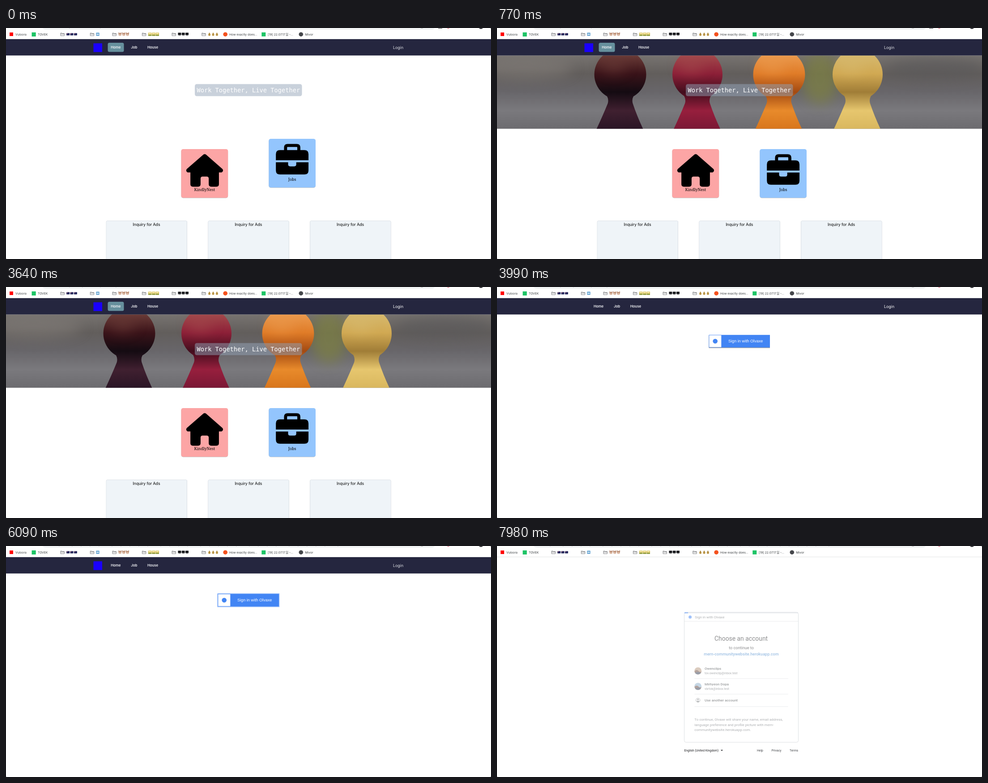
An HTML page that plays this animation: 1084x517 px, repeating every 8 s.

```html
<!DOCTYPE html>
<html lang="en">
<head>
<meta charset="utf-8">
<title>Work Together, Live Together</title>
<style>
  html, body { margin: 0; width: 100%; height: 100%; overflow: hidden; background: #fff; }
  svg { display: block; width: 100%; height: 100%; }
  text { font-family: Inter, "Noto Sans CJK KR", "Noto Sans CJK", sans-serif; white-space: pre; }
  .mono { font-family: "DejaVu Sans Mono", monospace; }
  .serif { font-family: "Noto Serif", serif; }
  .arial { font-family: "Liberation Sans", sans-serif; }
  .roboto { font-family: Roboto, sans-serif; }
  .soft { filter: blur(0.7px); }
  .haze { filter: blur(14px); }
</style>
</head>
<body>
<svg id="stage" viewBox="0 0 1084 517" preserveAspectRatio="none"></svg>
<script>
const LOOP = 8000, STEP = 70;
const AT = {
  cardRest: 350, photo: 770, jobOn: 2450, jobOff: 2520, loginOn: 3010, request: 3640,
  loginPage: 3990, loginOff: 4060, logo: 4340, buttonOn: 4620, redirect: 6090,
  blank: 7140, chooser: 7210, fade: 7910
};

const stage = document.getElementById('stage');
const rect = (x, y, w, h, fill, more = '') =>
  `<rect x="${x}" y="${y}" width="${w}" height="${h}" fill="${fill}" ${more}/>`;
const circle = (x, y, r, fill, more = '') =>
  `<circle cx="${x}" cy="${y}" r="${r}" fill="${fill}" ${more}/>`;
const path = (d, fill, more = '') => `<path d="${d}" fill="${fill}" ${more}/>`;
const text = (x, y, size, str, fill, more = '') =>
  `<text x="${x}" y="${y}" font-size="${size}" fill="${fill}" ${more}>${str}</text>`;
const group = (id, body, more = '') => `<g id="${id}" ${more}>${body}</g>`;
const MID = 'text-anchor="middle"';

// Browser chrome
const emoji = {
  flag: x => rect(x - 3.7, 11.6, 7, 4.8, '#22275c', 'rx=".6"') + rect(x - 3, 12.2, 2, 1.2, '#c65c6c'),
  sign: x => rect(x - 3.7, 10.4, 7.4, 7.2, '#5d9fd0', 'rx="1"') + rect(x - 2.6, 12.8, 5.2, 2.4, '#dcebf5'),
  face: x => circle(x - 2.4, 11.6, 1.3, '#a9745a') + circle(x + 2.4, 11.6, 1.3, '#a9745a') +
    circle(x, 14.2, 3.2, '#c99b80') + circle(x, 15.2, 1.4, '#f0d5c4') +
    circle(x - 1.2, 13.4, .45, '#333') + circle(x + 1.2, 13.4, .45, '#333'),
  scene: x => rect(x - 3.7, 10.4, 7.4, 7.2, '#d9bd4b', 'rx=".7"') + rect(x - 2.5, 11.6, 5, 2.4, '#f2eab6') +
    rect(x - 3.7, 15, 7.4, 2.6, '#8d9c44'),
  screen: x => rect(x - 3.6, 10.6, 7, 5.2, '#16171b', 'rx=".5"') + rect(x - 2.4, 16.2, 5, 1, '#777'),
  bag: x => circle(x, 15, 2.7, '#c9a557') + rect(x - 1.1, 10.7, 2.2, 2.4, '#a98236') +
    rect(x - .4, 13.6, .8, 2.8, '#705317')
};
const folder = (x, kind, ...spots) =>
  path(`M${x - 4} 11.2h3l1 1.1h4.4v5h-8.4zM${x - 4} 13.4h8.4`, '#f4f4f4', 'stroke="#6b6e72" stroke-width=".8"') +
  spots.map(emoji[kind]).join('');
const bookmark = (x, label) => text(x, 16.6, 6.75, label, '#3c4043');
const ticks = xs => xs.map(x => rect(x, 0, 1.6, .6, '#a8abb0')).join('');
const longAddress = Array.from({ length: 29 }, (_, i) => 118 + i * 22 + (i * 7) % 9);

const chrome =
  rect(0, 0, 1084, 25, '#fff') +
  path('M82 0C84 3 87 4 91 4H951Q956 4 958 0z', '#f1f3f4') +
  group('shortUrl', ticks([141, 210])) +
  group('loginUrl', ticks([141, 170, 210, 245])) +
  group('longUrl', ticks(longAddress)) +
  rect(927, 0, 5, .7, '#999') + group('stub', rect(966, 0, 9, 1, '#333')) +
  circle(988.5, -3.2, 4.1, '#d9304f') + circle(1061.5, -3.6, 5.8, '#2d2d31') + rect(1082.5, 0, 1.5, 1, '#777') +
  rect(8, 10, 8, 8, '#f00') + bookmark(21, 'Vuloora') +
  rect(57.5, 9.8, 9.2, 9.2, '#1ec466') + bookmark(71, 'TOVEK') +
  folder(126, 'flag', 138.8, 147.2, 155.6) + folder(192.3, 'sign', 205) +
  folder(242, 'face', 254.8, 263.2, 271.5) + folder(308.4, 'scene', 321.6, 330, 338.3) +
  folder(375, 'screen', 388, 396.3, 404.6) + folder(441.8, 'bag', 454.6, 463, 471.4) +
  circle(490.2, 14.2, 4.8, '#f4511e') + bookmark(499, 'How exactly does...') +
  rect(571.3, 9.8, 9, 9, '#1ec466') + bookmark(585, '[19] 22.07.17.일 -...') +
  circle(659.3, 14.2, 4.8, '#45474b') + bookmark(668.5, 'Mivor') +
  rect(0, 24.2, 1084, .8, '#dcdee0');

// Site header
const navItem = (x, label) => text(x, 46.3, 7.8, label, '#f1f2f5', 'font-weight="600"');
const header =
  rect(0, 25, 1084, 36.5, '#25263f') +
  group('logo', rect(195.5, 34.3, 19.5, 19.5, '#1a00ff')) +
  group('links',
    group('homeActive', rect(227.5, 33, 36, 20.6, '#66909d', 'rx="3.5"')) +
    group('jobHover', rect(272, 33, 28, 20.6, '#374151', 'rx="3.5"')) +
    navItem(234.2, 'Home') + navItem(279.2, 'Job') + navItem(316, 'House')) +
  text(865, 46.8, 8.9, 'Login', '#dfe1e6', 'id="login"');

// Landing page
const pawns = [
  { x: 275.5, r: 58, tones: ['#6b3c38', '#3a1319', '#140b12', '#402030', '#2a1525'] },
  { x: 448, r: 56, tones: ['#a34a4c', '#8d2038', '#430d1d', '#971f3d', '#7a1835'] },
  { x: 630.5, r: 58, tones: ['#eb9a4e', '#e07c28', '#a34a12', '#e88a2b', '#d8761c'] },
  { x: 806, r: 56, tones: ['#d6b96e', '#d1a953', '#a07d37', '#e6c66e', '#d9b75e'] }
];
const gradient = (id, colors, more) => `<linearGradient id="${id}" ${more}>` +
  colors.map((c, i) => `<stop offset="${i / (colors.length - 1)}" stop-color="${c}"/>`).join('') + '</linearGradient>';
const down = 'gradientUnits="userSpaceOnUse" x1="0" y1="61" x2="0" y2="226"';
const pawn = ({ x, r, tones }, i) => gradient('tone' + i, tones, down) +
  `<ellipse cx="${x}" cy="104" rx="${r}" ry="57" fill="url(#tone${i})"/>` +
  path(`M${x - 36} 144Q${x - 24} 156 ${x - 28} 169Q${x - 39} 196 ${x - 53} 226H${x + 51}Q${x + 37} 196 ${x + 28} 169Q${x + 24} 156 ${x + 36} 144z`, `url(#tone${i})`) +
  `<ellipse cx="${x - r * .25}" cy="84" rx="${r * .5}" ry="17" fill="${tones[0]}" opacity=".55" class="haze"/>`;
const photo =
  '<clipPath id="banner"><rect y="61.5" width="1084" height="164"/></clipPath>' +
  gradient('wall', ['#777370', '#625e5c', '#68666a', '#7a797d', '#6c6b6f'], down) +
  group('photo', rect(0, 61, 1084, 165, 'url(#wall)') +
    '<ellipse cx="722" cy="112" rx="42" ry="58" fill="#7d8044" opacity=".75" class="haze"/>' +
    '<ellipse cx="60" cy="90" rx="110" ry="24" fill="#827d79" opacity=".6" class="haze"/>' +
    '<ellipse cx="980" cy="90" rx="110" ry="24" fill="#59585a" opacity=".6" class="haze"/>' +
    pawns.map(pawn).join(''), 'clip-path="url(#banner)"');

const house = path('M266 8Q288-8 309 7L565 231C588 252 572 288 544 288H512V472Q512 512 472 512H392Q352 512 352 472V384Q352 352 320 352H256Q224 352 224 384V472Q224 512 184 512H104Q64 512 64 472V288H32C2 288-12 252 10 231z',
  '#000', 'transform="translate(403 282.3) scale(.1424)"');
const briefcase = path('M184 48H328q8 0 8 8V96H176V56q0-8 8-8zM128 56V96H64Q0 96 0 160V256H512V160Q512 96 448 96H384V56Q384 0 328 0H184Q128 0 128 56zM512 288H320v32q0 32-32 32H224q-32 0-32-32V288H0V416q0 64 64 64H448q64 0 64-64z',
  '#000', 'transform="translate(603.2 282.5) scale(.1424)"');
const card = (id, x, color, icon, label) => group(id,
  rect(x, 271.7, 104.7, 109, '#000', 'rx="4.6" opacity=".25" class="soft"') +
  rect(x, 271, 104.7, 109, color, 'rx="4.6"') + icon +
  text(x + 52.3, 365.2, 8.9, label, '#000', `class="serif" ${MID}`));
const ad = x =>
  rect(x, 431.6, 181, 100, '#64748b', 'rx="3" opacity=".5" class="soft"') +
  rect(x + .3, 431.8, 180.4, 100, '#eff4f8', 'rx="2.6"') +
  text(x + 90.2, 443.2, 8.8, 'Inquiry for Ads', '#000', MID);
const home = photo +
  rect(422, 125.4, 239.5, 27.2, '#94a3b8', 'rx="4.5" fill-opacity=".5"') +
  text(541.8, 143.8, 13.7, 'Work Together, Live Together', '#fff', `class="mono" ${MID}`) +
  card('houseCard', 391.5, '#fca5a5', house, 'KindlyNest') +
  card('jobCard', 587.3, '#93c5fd', briefcase, 'Jobs') +
  [223.8, 451.6, 679.4].map(ad).join('');

// Login page
const signIn =
  group('shade', rect(473.5, 108.2, 136.5, 28.4, '#000', 'opacity=".4" class="soft"')) +
  group('glow', rect(472, 105.7, 139.5, 31.4, '#4285f4', 'rx="1" opacity=".42" class="soft"')) +
  rect(473.5, 107.2, 136.5, 28.2, '#4285f4') + rect(474.3, 108, 27, 26.6, '#fff') +
  circle(487.7, 121.3, 5.3, '#4285f4') +
  text(555.7, 124.2, 9.1, 'Sign in with Olvaxe', '#fff', `class="arial" ${MID}`);

// Account chooser
const line = (x, y, w) => rect(x, y, w, .7, '#c9ccd1');
const medium = 'class="roboto" font-weight="500"';
const plain = 'class="roboto"';
const centered = `class="roboto" ${MID}`;
const avatar = (y, sky) => circle(449.2, y, 8, sky) +
  path(`M441.3 ${y + 1}Q446 ${y - 4} 450 ${y}T457.1 ${y + 1}A8 8 0 0 1 441.3 ${y + 1}z`, '#6c4a3d') +
  path(`M442.6 ${y + 4.6}Q449 ${y} 455.8 ${y + 4.6}A8 8 0 0 1 442.6 ${y + 4.6}z`, '#353f55');
const account = (y, sky, name, mail) => avatar(y, sky) +
  text(464, y - 2, 8, name, '#3c4043', medium) + text(464, y + 8, 6.8, mail, '#5f6368', plain) +
  line(441.3, y + 17, 209.4);
const notice = [
  'To continue, Olvaxe will share your name, email address,',
  'language preference and profile picture with mern-',
  'communitywebsite.herokuapp.com.'
];
const chooser =
  rect(418.5, 148.3, 255, 291, '#fff', 'rx="4" stroke="#d5d8dc" stroke-width=".8"') +
  group('cardBody',
    group('progress', rect(419, 148.3, 254, 2.4, '#d9dde3') + rect(419, 148.3, 8, 2.4, '#4285f4', 'id="bar"')) +
    circle(431.6, 159, 3.5, '#4285f4') + text(442.3, 162, 7.95, 'Sign in with Olvaxe', '#5f6368', plain) +
    line(419, 168, 254.2) +
    text(545.6, 212, 13.9, 'Choose an account', '#202124', centered) +
    text(546, 231.2, 9.1, 'to continue to', '#202124', centered) +
    text(546, 244.8, 9.1, 'mern-communitywebsite.herokuapp.com', '#3f83c9', `${medium} ${MID}`) +
    account(279.4, '#b99a80', 'Owenclips', 'tov.owenclip@inbox.test') +
    account(314.2, '#8fb0cc', 'Mirhyeon Dopa', 'vbrtok@inbox.test') +
    circle(449.2, 345.2, 4.5, 'none', 'stroke="#5f6368" stroke-width=".9"') +
    circle(449.2, 343.8, 1.5, '#5f6368') + path('M446.2 348Q449.2 345.2 452.2 348Q449.2 350 446.2 348z', '#5f6368') +
    text(464, 348, 8, 'Use another account', '#3c4043', medium) + line(441.3, 359.2, 209.4) +
    notice.map((s, i) => text(441.3, 391.2 + i * 11.45, 7.95, s, '#5f6368', plain)).join('')) +
  text(418.5, 459.9, 6.8, 'English (United Kingdom)', '#202124', plain) + path('M500 456.2h5l-2.5 2.6z', '#202124') +
  text(581, 459.9, 6.8, 'Help', '#44474b', plain) + text(613.5, 459.9, 6.8, 'Privacy', '#44474b', plain) +
  text(654, 459.9, 6.8, 'Terms', '#44474b', plain);

stage.innerHTML = rect(0, 0, 1084, 517, '#fff') +
  group('home', home) + group('signIn', signIn) + group('header', header) +
  group('chooser', chooser) + chrome +
  path('M0 515.5V517H1.5Q.4 516.6 0 515.5zM1084 515.5V517H1082.5Q1083.6 516.6 1084 515.5z', '#555');

const el = {};
stage.querySelectorAll('[id]').forEach(node => { el[node.id] = node; });
const show = (id, on) => el[id].setAttribute('display', on ? 'inline' : 'none');
const alpha = (id, v) => el[id].setAttribute('opacity', v);
const clamp = v => Math.min(1, Math.max(0, v));

function bezier(x1, y1, x2, y2, x) {
  const at = (a, b, s) => 3 * a * s * (1 - s) ** 2 + 3 * b * s * s * (1 - s) + s ** 3;
  let lo = 0, hi = 1;
  for (let i = 0; i < 24; i++) {
    const s = (lo + hi) / 2;
    if (at(x1, x2, s) < x) lo = s; else hi = s;
  }
  return at(y1, y2, lo);
}

// One-second bounce by a quarter of the card height
function bounce(t) {
  if (t >= AT.cardRest) return 0;
  const phase = (.753 + t / 1000) % 1;
  const lift = phase < .5
    ? 1 - bezier(.8, 0, 1, 1, phase * 2)
    : bezier(0, 0, .2, 1, phase * 2 - 1);
  return -27.25 * lift;
}

function draw(time) {
  const t = Math.floor(time / STEP) * STEP;
  const onHome = t < AT.loginPage;
  const onLogin = !onHome && t < AT.blank;
  const hasLogo = onHome || t >= AT.logo;

  show('home', onHome);
  show('signIn', onLogin);
  show('header', onHome || onLogin);
  show('chooser', t >= AT.chooser);

  show('photo', t >= AT.photo);
  el.jobCard.setAttribute('transform', `translate(0 ${bounce(t)})`);

  show('logo', hasLogo);
  show('homeActive', onHome);
  show('jobHover', t >= AT.jobOn && t < AT.jobOff);
  el.links.setAttribute('transform', `translate(${hasLogo ? 0 : -18.2} 0)`);
  el.login.setAttribute('fill', t >= AT.loginOn && t < AT.loginOff ? '#fff' : '#dfe1e6');

  const hover = clamp((t - AT.buttonOn) / 218);
  alpha('shade', 1 - hover);
  alpha('glow', hover);

  show('shortUrl', t < AT.request);
  show('loginUrl', t >= AT.request && t < AT.redirect);
  show('longUrl', t >= AT.redirect);
  show('stub', t < AT.request);

  const fade = clamp((t - AT.fade + STEP) / (2 * STEP));
  alpha('cardBody', 1 - fade / 2);
  show('progress', fade > 0);
  el.bar.setAttribute('width', 8 * fade);
}

const start = performance.now();
function tick() {
  draw((performance.now() - start) % LOOP);
  requestAnimationFrame(tick);
}
tick();
</script>
</body>
</html>
```
